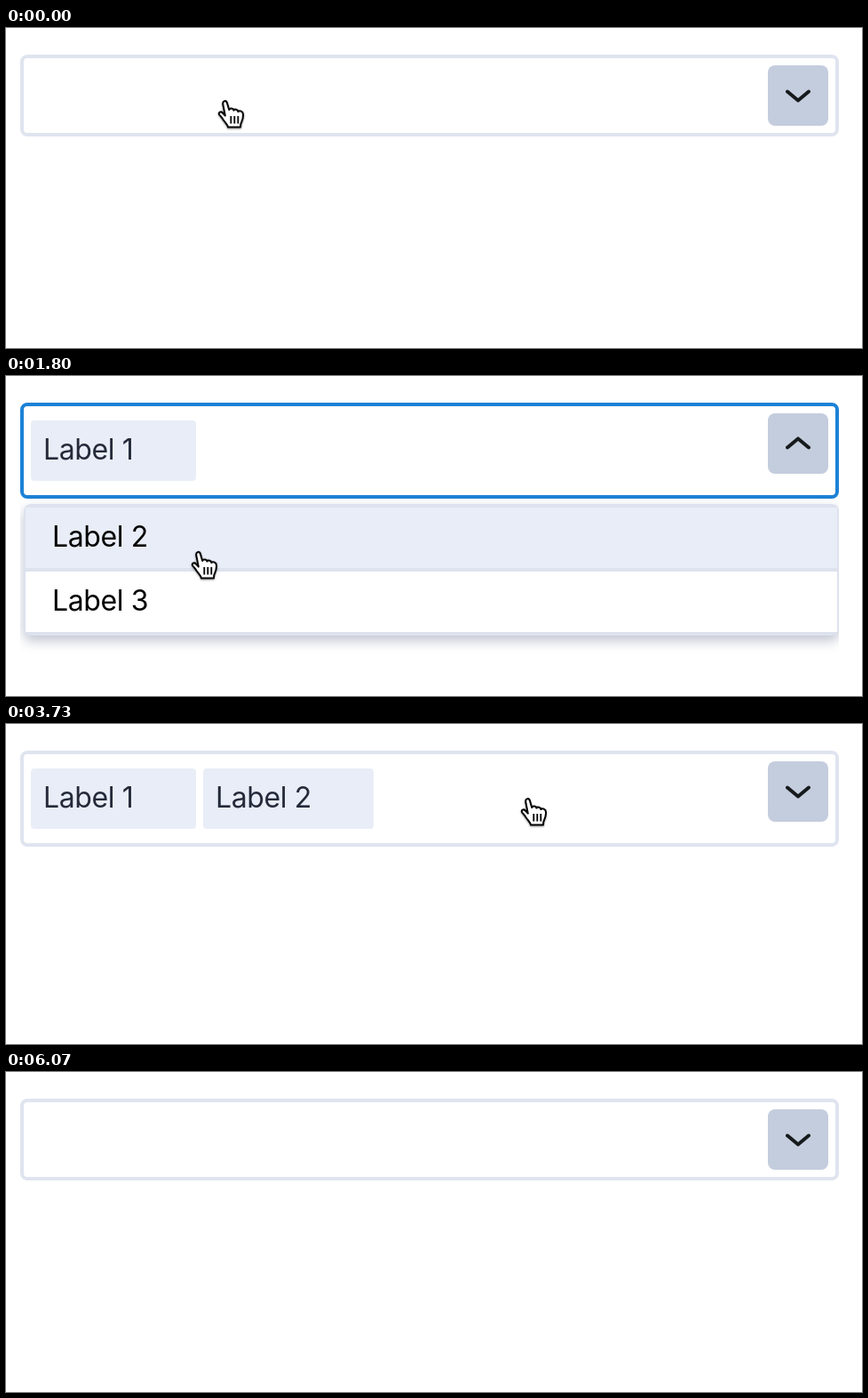
Animation, 964 px wide and 360 px high, one loop 6.74 s. Source, as an HTML page:

```html
<!DOCTYPE html>
<html lang="en">
<head>
<meta charset="utf-8">
<title>Multi-select</title>
<style>
html, body { margin: 0; width: 100%; height: 100%; overflow: hidden; background: #fff; }
svg { display: block; }
text { font: 400 32px Inter, "Liberation Sans", sans-serif; letter-spacing: -.4px; }

.box, .chevron, .menu, .chip, .hand, .arrow { animation: 6.74s step-end infinite; }
.box { fill: #fff; stroke-width: 4; animation-name: box; }
.button { fill: #c4cddd; }
.chevron {
  fill: none; stroke: #161a1c; stroke-width: 4; stroke-linecap: round; stroke-linejoin: round;
  transform-origin: 892px 76px; animation-name: flip;
}

.panel { fill: #dde2ee; filter: drop-shadow(0 6px 7px rgba(60, 70, 110, .32)); }
.row { fill: #fff; }
.active, .chip rect { fill: #e9edf7; }
.chip text { fill: #252a3a; }
.chip path { stroke: #17191d; stroke-width: 4.2; }
.menu1 { animation-name: menu1; }
.menu2 { animation-name: menu2; }
.menu3 { animation-name: menu3; }
.chip1 { animation-name: chip1; }
.chip2 { animation-name: chip2; }
.chip3 { animation-name: chip3; }

.cursor { animation: move 6.74s linear infinite; filter: drop-shadow(0 1.5px 1.2px rgba(0, 0, 0, .4)); }
.hand { fill: #fff; stroke: #000; stroke-width: 2; stroke-linejoin: round; animation-name: hand; }
.arrow { fill: #000; stroke: #fff; stroke-width: 2; animation-name: arrow; }

@keyframes box {
  0%, to { height: 88px; stroke: #dfe4ef; }
  5.93% { height: 88px; stroke: #1c82d6; }
  13.79% { height: 104px; stroke: #dfe4ef; }
  18.84% { height: 104px; stroke: #1c82d6; }
  27.74% { height: 104px; stroke: #dfe4ef; }
  36.64% { height: 104px; stroke: #1c82d6; }
  42.57% { height: 180px; stroke: #dfe4ef; }
  55.33% { height: 104px; stroke: #dfe4ef; }
  77.14% { height: 88px; stroke: #dfe4ef; }
}
@keyframes flip {
  0%, 13.79%, 27.74%, 42.57%, to { transform: none; }
  5.93%, 18.84%, 36.64% { transform: scaleY(-1); }
}
@keyframes menu1 { 0%, 13.79%, to { visibility: hidden; } 5.93% { visibility: visible; } }
@keyframes menu2 { 0%, 27.74%, to { visibility: hidden; } 18.84% { visibility: visible; } }
@keyframes menu3 { 0%, 42.57%, to { visibility: hidden; } 36.64% { visibility: visible; } }
@keyframes chip1 { 0%, 77.14%, to { visibility: hidden; } 13.79% { visibility: visible; } }
@keyframes chip2 { 0%, 66.31%, to { visibility: hidden; } 27.74% { visibility: visible; } }
@keyframes chip3 { 0%, 55.33%, to { visibility: hidden; } 42.57% { visibility: visible; } }

@keyframes hand {
  0%, 11.8%, to { visibility: visible; }
  9.8%, 83.08% { visibility: hidden; }
}
@keyframes arrow {
  0%, 11.8%, 84.11%, to { visibility: hidden; }
  9.8%, 83.08% { visibility: visible; }
}
@keyframes move {
  0% { transform: translate(238px, 80px); }
  5.93% { transform: translate(239px, 83px); animation-timing-function: ease-in; }
  10.83% { transform: translate(214px, 154px); animation-timing-function: ease-out; }
  12.4%, 13.9% { transform: translate(208px, 163px); animation-timing-function: ease-in-out; }
  17.8%, 19% { transform: translate(232px, 86px); animation-timing-function: ease-in-out; }
  22.7% { transform: translate(218px, 228px); }
  26.71% { transform: translate(208px, 196px); animation-timing-function: ease-out; }
  28% { transform: translate(207px, 191px); animation-timing-function: ease-in-out; }
  34.6%, 36.8% { transform: translate(440px, 86px); animation-timing-function: ease-in-out; }
  40.5%, 42.7% { transform: translate(432px, 156px); animation-timing-function: ease-in-out; }
  52.4%, 55.4% { transform: translate(579px, 82px); animation-timing-function: ease-in-out; }
  65.2%, 68.2% { transform: translate(390px, 82px); animation-timing-function: ease-in-out; }
  76.1%, 77.1% { transform: translate(178px, 83px); }
  79.1%, 83.07% { transform: translate(192px, 84px); }
  83.08%, to { transform: translate(581px, 4px); }
}
</style>
</head>
<body>
<svg width="964" height="360" viewBox="0 0 964 360">
  <defs>
    <clipPath id="view"><rect x="16" y="30" width="922" height="300"/></clipPath>
    <path id="cross" d="M-8.5-8.5 8.5 8.5M8.5-8.5-8.5 8.5"/>
  </defs>

  <rect class="box" x="18" y="32" width="918" height="88" rx="6"/>
  <rect class="button" x="858" y="42" width="68" height="68" rx="8"/>
  <path class="chevron" d="M880 71.5 892 81.5 904 71.5"/>

  <g class="chip chip1">
    <rect x="28" y="50" width="186" height="68" rx="4"/>
    <text x="42" y="94">Label 1</text>
    <use href="#cross" x="185.5" y="87"/>
  </g>
  <g class="chip chip2">
    <rect x="222" y="50" width="192" height="68" rx="4"/>
    <text x="236" y="94">Label 2</text>
    <use href="#cross" x="386.5" y="87"/>
  </g>
  <g class="chip chip3">
    <rect x="422" y="50" width="194" height="68" rx="4"/>
    <text x="437" y="94">Label 3</text>
    <use href="#cross" x="587" y="87"/>
  </g>

  <g clip-path="url(#view)">
    <g class="menu menu1" transform="translate(0 126)">
      <rect class="panel" x="20" width="918" height="220" rx="8"/>
      <rect class="active" x="22" y="4" width="914" height="68"/>
      <rect class="row" x="22" y="76" width="914" height="68"/>
      <rect class="row" x="22" y="148" width="914" height="68"/>
      <text x="52" y="48">Label 1</text>
      <text x="52" y="120">Label 2</text>
      <text x="52" y="192">Label 3</text>
    </g>
    <g class="menu menu2" transform="translate(0 144)">
      <rect class="panel" x="20" width="918" height="148" rx="8"/>
      <rect class="active" x="22" y="4" width="914" height="68"/>
      <rect class="row" x="22" y="76" width="914" height="68"/>
      <text x="52" y="48">Label 2</text>
      <text x="52" y="120">Label 3</text>
    </g>
    <g class="menu menu3" transform="translate(0 144)">
      <rect class="panel" x="20" width="918" height="76" rx="8"/>
      <rect class="active" x="22" y="4" width="914" height="68"/>
      <text x="52" y="48">Label 3</text>
    </g>
  </g>

  <g class="cursor">
    <g class="hand">
      <path d="M8.8 18.6 6.3 6C5.5 1.5 10 .8 11 4.5L13.2 12C14 9.8 18 10 18.4 12.6 19.6 10.8 23 11.5 23.4 14 25 12.6 28.8 13.6 29 17 29.4 22 27.5 25 26.3 28L26 31.5H12C11.5 28.5 8.5 26 6.5 23 5 20.5 3.8 19.5 2.2 17.5.6 15 4 13.2 6 15.5Z"/>
      <path d="M15.3 19V27.5M19.3 19V27.5M23.3 19V27.5" stroke-width="1.8"/>
    </g>
    <path class="arrow" d="M1 1V27.5L7 21.8 11.5 33 16.5 31 12 20.2H20Z"/>
  </g>
</svg>
</body>
</html>
```
